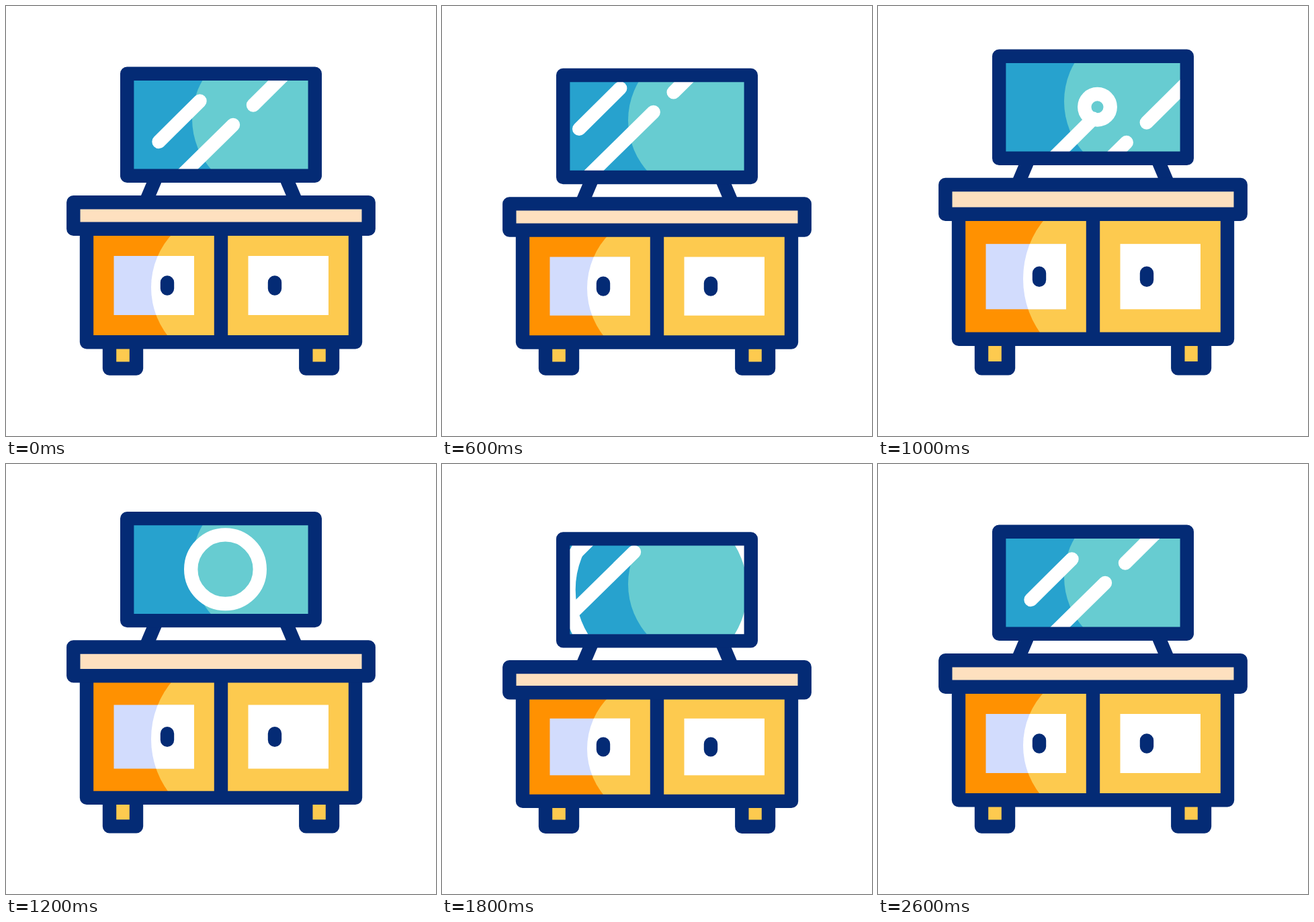
Write an HTML page that moves like this. It is 640x640 px and loops after 2.84 s.

```html
<!DOCTYPE html>
<html lang="en">
<head>
<meta charset="utf-8">
<title>TV stand</title>
<style>
  html, body { margin: 0; width: 100%; height: 100%; overflow: hidden; background: #fff; }
  svg { display: block; width: 100%; height: 100%; }
  .line { fill: none; stroke: #042b75; stroke-width: 20.4; stroke-linejoin: round; vector-effect: non-scaling-stroke; }
  .knob { stroke-linecap: round; }
  .shine { fill: none; stroke: #fff; stroke-width: 20.4; stroke-linecap: round; }
  .yellow { fill: #fdca4f; }
</style>
</head>
<body>
<svg viewBox="0 0 640 640">
  <defs>
    <clipPath id="screen"><rect x="190" y="110" width="260" height="133"/></clipPath>
    <clipPath id="door"><rect x="125" y="337" width="190" height="158"/></clipPath>
    <clipPath id="panel"><rect x="160.5" y="372" width="119.5" height="88"/></clipPath>
  </defs>

  <g id="tv">
    <path class="line" d="M224.6 252.5 207 294M415.4 252.5 433 294"/>
    <g clip-path="url(#screen)">
      <rect x="180" y="100" width="280" height="153" fill="#27a2ce"/>
      <circle cx="391" cy="168" r="114" fill="#67ccd1"/>
      <rect x="391" y="100" width="70" height="153" fill="#67ccd1"/>
      <path id="streaks" class="shine" d="M227.5 202 288.5 141.5M223 290 338 177M368 147.5 440 76"/>
      <circle id="ring" class="shine" cx="326.5" cy="176.3"/>
      <circle id="ripple" class="shine" cx="326.5" cy="176.3"/>
    </g>
    <rect class="line" x="180.2" y="100.7" width="279.6" height="152"/>
  </g>

  <g id="cabinet">
    <path class="yellow" d="M154 500h40v39.6h-40zM446.3 500h40v39.6h-40z"/>
    <path class="line" d="M154 500v39.6h40V500M446.3 500v39.6h39.7V500"/>
    <rect x="120" y="332" width="200" height="168" fill="#ff9101"/>
    <rect class="yellow" x="320" y="332" width="200" height="168"/>
    <g clip-path="url(#door)"><circle class="yellow" cx="333" cy="419" r="117"/></g>
    <rect x="160.5" y="372" width="119.5" height="88" fill="#d2dcfd"/>
    <g clip-path="url(#panel)"><circle cx="333" cy="419" r="117" fill="#fff"/></g>
    <rect x="360.5" y="372" width="119.5" height="88" fill="#fff"/>
    <path class="line knob" d="M240 411.5v9M400 411.5v9"/>
    <path class="line" d="M120 332v168.2h400V332M320 332v168"/>
    <rect class="line" x="100.3" y="292.2" width="439.4" height="39.6" style="fill:#fee0bf"/>
  </g>
</svg>
<script>
  const LOOP = 2840, STEP = 40, BASE = 543;
  const $ = id => document.getElementById(id);
  const [tv, cabinet, streaks, ring, ripple] =
    ['tv', 'cabinet', 'streaks', 'ring', 'ripple'].map($);

  // [time, value]
  const bounce = [[0, 0], [330, 19.5], [930, -26], [1015, -26], [1610, 20], [2000, 0]];
  const ringSize = [[880, 0], [1200, 51.3], [1480, 85.5], [1800, 138], [2000, 171]];

  const linear = u => u;
  const smooth = u => u * u * (3 - 2 * u);

  // cubic-bezier(.6, 0, .4, 1)
  function swing(x) {
    let lo = 0, hi = 1;
    for (let i = 0; i < 20; i++) {
      const m = (lo + hi) / 2, n = 1 - m;
      if (1.8 * m * n * n + 1.2 * m * m * n + m ** 3 < x) lo = m; else hi = m;
    }
    return smooth(lo);
  }

  function sample(keys, t, ease) {
    if (t <= keys[0][0]) return keys[0][1];
    for (let i = 1; i < keys.length; i++) {
      const [a, from] = keys[i - 1], [b, to] = keys[i];
      if (t < b) return from + (to - from) * ease((t - a) / (b - a));
    }
    return keys[keys.length - 1][1];
  }

  // wind up, sweep out at the lower right, return from the upper left
  function streakShift(t) {
    if (t < 480) return [-24 * smooth(t / 480), 0.8];
    if (t < 1340) return [-24 + 13 * ((t - 480) / 320) ** 3, 0.82];
    const left = Math.max(0, 2600 - t) / 800;
    return [-52 * left * left, 0.885];
  }

  function setRing(el, r, alpha) {
    el.setAttribute('r', Math.max(r, 0));
    el.setAttribute('opacity', r > 0 ? alpha : 0);
  }

  function draw(t) {
    const dy = sample(bounce, t, swing);
    const scale = 1 - dy / (dy > 0 ? 268 : 249);
    tv.setAttribute('transform', `translate(0 ${dy})`);
    cabinet.setAttribute('transform', `translate(0 ${BASE}) scale(1 ${scale}) translate(0 ${-BASE})`);

    const [x, slope] = streakShift(t);
    streaks.setAttribute('transform', `translate(${x} ${x * slope - dy})`);

    setRing(ring, sample(ringSize, t, linear), t < 2000 ? 1 : 0);
    setRing(ripple, (t - 1400) * 0.166, Math.max(0, Math.min(1, (1700 - t) / 300)));
  }

  function tick() {
    draw(Math.floor(performance.now() % LOOP / STEP) * STEP);
    requestAnimationFrame(tick);
  }
  tick();
</script>
</body>
</html>
```
